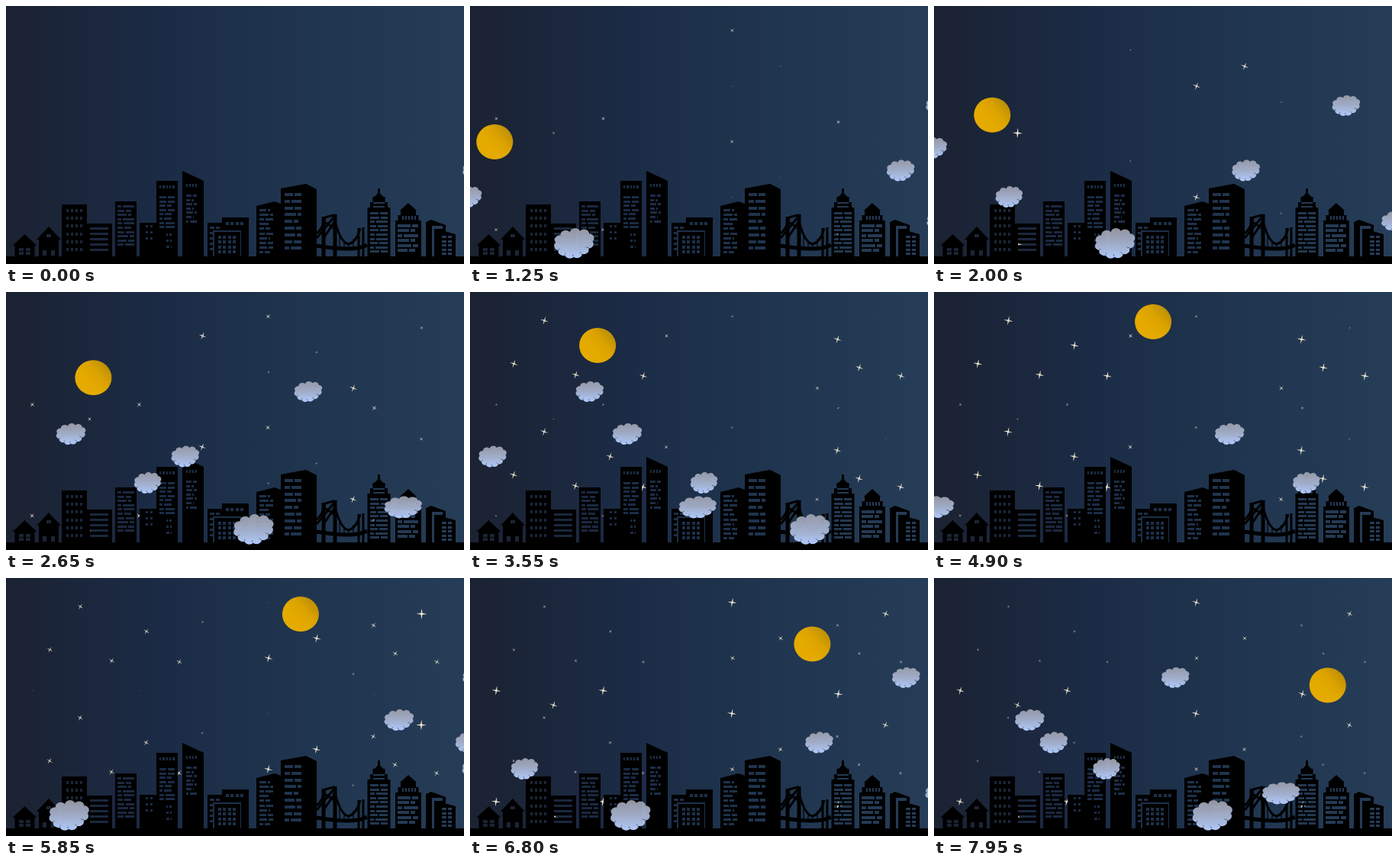
These frames come from a looping animation (600 px wide and 338 px high, 8 s). An HTML page with a canvas:

```html
<!DOCTYPE html>
<html lang="en">
<head>
<meta charset="utf-8">
<title>City night</title>
<style>
  html, body { margin: 0; width: 100%; height: 100%; overflow: hidden; background: #1c2b42; }
  canvas { display: block; width: 100vw; height: 100vh; }
</style>
</head>
<body>
<canvas id="stage" width="600" height="338"></canvas>
<script>
const W = 600, H = 338, GROUND = 328, LOOP = 8000, STEP = 50;
const TAU = 2 * Math.PI;
const ctx = document.getElementById('stage').getContext('2d');

function layer(draw) {
  const c = document.createElement('canvas');
  c.width = W;
  c.height = H;
  draw(c.getContext('2d'));
  return c;
}

function seeded(seed) {
  return () => (seed = (seed * 16807) % 2147483647) / 2147483647;
}

function fade(g, x0, y0, x1, y1, ...colors) {
  const grad = g.createLinearGradient(x0, y0, x1, y1);
  colors.forEach((c, i) => grad.addColorStop(i / (colors.length - 1), c));
  return grad;
}

// ---------- skyline ----------
const city = layer(g => {
  const block = (x, y, w) => g.fillRect(x, y, w, GROUND - y);
  const hole = (x, y, w, h) => g.clearRect(x, y, w, h);
  const triangle = (cx, top, half, h) => {
    g.beginPath();
    g.moveTo(cx - half, top + h);
    g.lineTo(cx, top);
    g.lineTo(cx + half, top + h);
    g.fill();
  };
  // block with a sloped roof that peaks at px
  const sloped = (x, left, px, peak, w, right) => {
    g.beginPath();
    g.moveTo(x, GROUND);
    g.lineTo(x, left);
    g.lineTo(px, peak);
    g.lineTo(x + w, right);
    g.lineTo(x + w, GROUND);
    g.fill();
  };
  const grid = (x, y, cols, rows, dx, dy, w, h) => {
    for (let r = 0; r < rows; r++)
      for (let c = 0; c < cols; c++) hole(x + c * dx, Math.round(y + r * dy), w, h);
  };
  // rows of bars, each split at a random place
  const rooms = (x, y, w, bottom, dy, h) => {
    const rnd = seeded(x * 7919 + y);
    for (; y + h <= bottom; y += dy) {
      const cut = Math.round(w * (0.25 + 0.5 * rnd()));
      hole(x, Math.round(y), cut - 1, h);
      hole(x + cut + 1, Math.round(y), w - cut - 1 - (rnd() < 0.3 ? 4 : 0), h);
    }
  };
  const house = (cx, top, half, h) => {
    triangle(cx, top, half, h);
    block(cx - half + 3, top + h - 1, 2 * half - 6);
  };
  // tiers widening downwards
  const tiers = (cx, top, half, count, rise, grow) => {
    for (let i = 0; i < count; i++) block(cx - half - i * grow, top + i * rise, 2 * (half + i * grow));
  };
  const line = (width, d) => {
    g.lineWidth = width;
    g.stroke(new Path2D(d));
  };

  g.fillStyle = g.strokeStyle = '#000';
  g.fillRect(0, GROUND, W, H - GROUND);

  house(24.5, 299, 16, 15);
  grid(17, 317, 2, 2, 9, 5, 6, 4);
  house(56, 289, 16, 17);
  hole(53, 299, 6, 4);
  grid(48, 320, 2, 1, 11, 0, 5, 7);

  block(73, 260, 33);
  grid(79, 266, 4, 6, 6, 10.2, 3, 4);
  block(106, 285, 33);
  grid(110, 290, 1, 5, 0, 7, 24, 3);
  block(143, 256, 28);
  rooms(146, 261, 22, 319, 5.6, 3);
  block(175, 284, 24);
  grid(183, 287, 2, 3, 6, 8, 3, 3);
  block(197, 229, 28);
  grid(201, 235, 5, 1, 4.3, 0, 2.4, 4);
  rooms(201, 249, 20, 296, 5.6, 3);
  rooms(210, 298, 11, 319, 8, 3);
  sloped(231, 216, 231, 216, 28, 229);
  grid(236, 233, 4, 1, 4, 0, 2.4, 4);
  rooms(236, 247, 14, 288, 5.6, 3);

  block(264, 284, 19);
  rooms(267, 289, 13, 326, 7, 3);
  block(283, 277, 35);
  grid(288, 283, 4, 1, 6.4, 0, 4, 4);
  hole(271, 294, 37, GROUND - 294);
  block(273, 296, 34);
  grid(278, 301, 4, 4, 6.3, 6.4, 4, 4);
  sloped(328, 262, 352, 256, 32, 259);
  rooms(332, 266, 18, 326, 6.1, 3);
  sloped(360, 239, 393, 233, 47, 240);
  rooms(365, 245, 22, 326, 8.8, 4);

  // bridge: towers, braces, cables, hangers, deck
  line(5, 'M416 276V328M431 273V328');
  line(3, 'M416 282L431 292M416 304L431 282M407 304L430 276');
  line(3, 'M462 291V328M468 290V328');
  line(3, 'M407 298Q415 292 418 277L429 274Q437 309 448 312Q459 310 464 291');
  line(5, 'M407 314Q430 318 447 318T473 313');
  for (let x = 437; x < 460; x += 6) line(1.2, `M${x} ${312 - Math.abs(x - 448)}V318`);

  const spire = 488.5;
  triangle(spire, 244, 9, 9);
  g.fillRect(spire - 1.5, 239, 3, 10);
  tiers(spire, 250, 8, 3, 7, 3.5);
  grid(481, 257, 1, 2, 0, 5, 15, 2);
  rooms(477, 270, 23, 326, 5.6, 3);
  triangle(527, 258, 11, 10);
  tiers(527, 267, 10, 3, 7, 3.5);
  grid(519, 275, 5, 1, 4, 0, 2, 5);
  rooms(513, 286, 27, 324, 6.4, 3.5);

  sloped(550, 283, 557, 280, 26, 287);
  hole(558, 288, 14, 4);
  hole(558, 288, 3, 40);
  sloped(562, 294, 567, 293, 27, 299);
  grid(571, 301, 2, 5, 7.5, 5.6, 5.5, 3);
});

// ---------- sky ----------
const sky = layer(g => {
  g.fillStyle = fade(g, 0, 0, W, 0, '#1b2232', '#1b2b45', '#20354f', '#263d57');
  g.fillRect(0, 0, W, H);
});

// Stars come in waves; each grows and turns upright, then starts over.
const WAVES = [
  { start: 680, at: [[343.5, 32], [34.5, 147.5], [174.5, 147.5], [482.5, 152]] },
  { start: 800, at: [[109.5, 166.5]] },
  { start: 1040, at: [[407, 79], [344, 105]] },
  { start: 1700, at: [[257.5, 57.5], [455, 126]] },
  { start: 2120, at: [[544.5, 47]] },
  { start: 2550, at: [[57.5, 94], [227, 110], [481.5, 62], [564.5, 110],
                      [138.5, 108.5], [184, 70], [97.5, 37.5], [510, 99]] }
];
const TWINKLE = 1250, TILE = 145.6, STAR_R = 7;

function drawStar(x, y, s) {
  ctx.beginPath();
  for (let i = 0; i < 8; i++) {
    const r = STAR_R * s * (i % 2 ? 0.2 : 1);
    const a = (1 - s) * TAU / 4 + i * TAU / 8;
    ctx.lineTo(x + r * Math.cos(a), y + r * Math.sin(a));
  }
  ctx.fill();
}

function drawStars(t) {
  ctx.fillStyle = '#f8eed6';
  for (const { start, at } of WAVES) {
    if (t < start) continue;
    const s = ((t - start) / TWINKLE) % 1;
    ctx.globalAlpha = 0.5 + 0.5 * s;
    for (const [x, y] of at) {
      drawStar(x, y, s);
      drawStar(x - 0.4, y + TILE, s);
    }
  }
  ctx.globalAlpha = 1;
}

// ---------- moon ----------
function drawMoon(t) {
  // mirrored path: shallow and fast near the top, steeper outside
  const d = (t - 5000) / 1000;
  const inner = Math.min(1, Math.abs(d)), outer = Math.abs(d) - inner;
  ctx.save();
  ctx.translate(297.5 + Math.sign(d) * (104 * inner + 58.6 * outer), 38 + 11 * inner + 46.9 * outer);
  ctx.fillStyle = fade(ctx, -6, 6, 18, -15, '#e4aa00', '#dca300', '#bd9006');
  ctx.beginPath();
  ctx.ellipse(0, 0, 24, 23, 0, 0, TAU);
  ctx.fill();
  ctx.restore();
}

// ---------- clouds ----------
const CYCLE = 5000, BUMPS = 11;

const drift = u => -58 + 0.1343 * u;
const glide = u => {
  const p = Math.min(1, Math.max(0, (u - 560) / 3780));
  return 598 - 655 * (1 - Math.cos(Math.PI * p)) / 2;
};

const CLOUDS = [
  { path: glide, y: 130.5, w: 37, h: 27, delay: 600 },
  { path: drift, y: 186, w: 39, h: 28, delay: 1730 },
  { path: glide, y: 215.5, w: 37, h: 28, delay: 0 },
  { path: drift, y: 250, w: 36, h: 28, delay: 970 },
  { path: glide, y: 282, w: 50, h: 29, delay: 1110 },
  { path: drift, y: 311, w: 53, h: 40, delay: 0 }
];

// point on the cloud's rim, narrower below and lifted on the right
function rim(i) {
  const a = i * TAU / BUMPS + 0.2;
  return [Math.cos(a) * (0.37 - 0.06 * Math.sin(a)), Math.sin(a) * 0.35 - Math.cos(a) * 0.05];
}

function drawCloud({ path, y, w, h, delay }, t) {
  if (t < delay) return;
  ctx.save();
  ctx.translate(path((t - delay) % CYCLE) + w / 2, y);
  ctx.scale(w, h);
  ctx.fillStyle = fade(ctx, 0, -0.5, 0, 0.5, 'rgba(162,164,176,.9)', 'rgba(167,179,208,.95)', '#b0cafb');
  ctx.beginPath();
  ctx.ellipse(0, 0, 0.36, 0.36, 0, 0, TAU);
  for (let i = 0; i < BUMPS; i++) {
    const [x, y] = rim(i);
    ctx.moveTo(x + 0.13, y);
    ctx.ellipse(x, y, 0.13, 0.15, 0, 0, TAU);
  }
  ctx.fill();

  // creases between the lower bumps
  ctx.strokeStyle = '#26364f';
  ctx.lineWidth = 0.7 / w;
  ctx.beginPath();
  for (let i = 0; i < 5; i++) {
    const [x, y] = rim(i + 0.5);
    ctx.moveTo(x * 1.22, y * 1.22);
    ctx.lineTo(x * 1.02 - 0.02, y * 1.02);
  }
  ctx.stroke();
  ctx.restore();
}

function render(now) {
  const t = Math.floor((now % LOOP) / STEP) * STEP;
  ctx.drawImage(sky, 0, 0);
  drawStars(t);
  drawMoon(t);
  ctx.drawImage(city, 0, 0);
  for (const cloud of CLOUDS) drawCloud(cloud, t);
}

let origin;
function tick(now) {
  origin ??= now;
  render(Math.max(0, now - origin));
  requestAnimationFrame(tick);
}
render(0);
requestAnimationFrame(tick);
</script>
</body>
</html>
```
